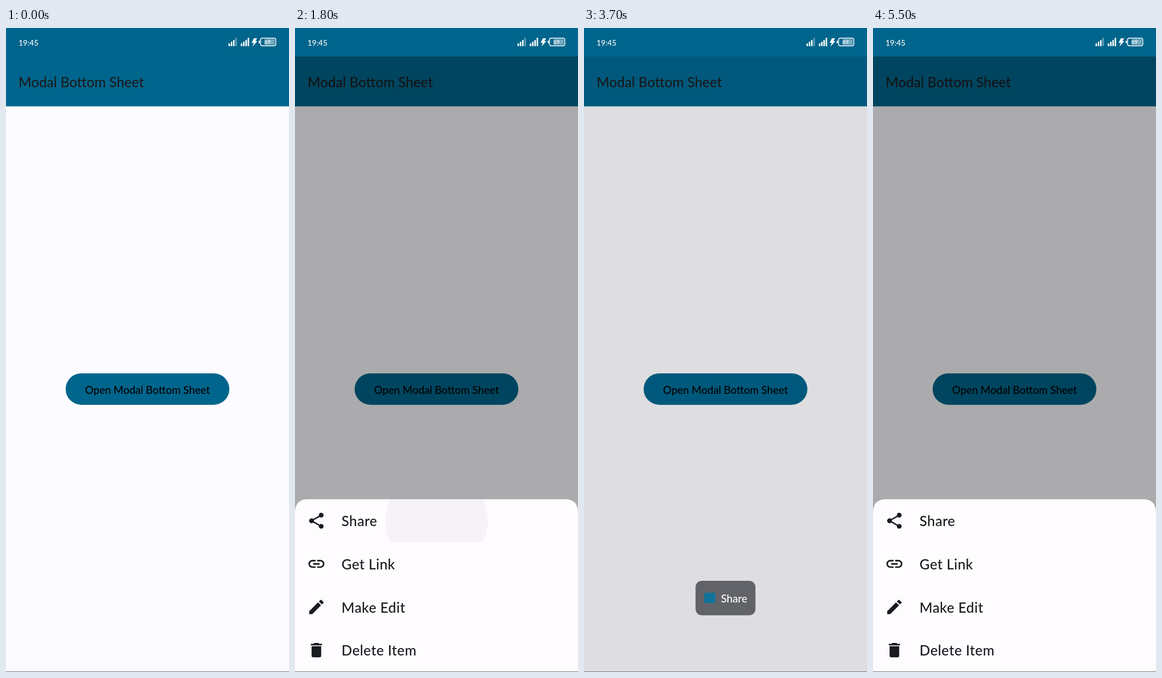
Recreate the animation shown at these times as an HTML page. Size 496 by 1130 pixels, loop 5.6 s.

```html
<!DOCTYPE html>
<html lang="en">
<head>
<meta charset="utf-8">
<title>Modal Bottom Sheet</title>
<style>
  html, body { margin: 0; width: 100%; height: 100%; overflow: hidden; background: #fcfbff; }
  svg { display: block; width: 100%; height: 100%; }
  text { font-family: Lato, "Open Sans", sans-serif; font-weight: 500; white-space: pre; }
  #rows text { font-size: 24.4px; letter-spacing: .5px; }
  #rows { fill: #191b1e; }
</style>
</head>
<body>
<svg viewBox="0 0 496 1130">
  <defs>
    <clipPath id="buttonClip"><rect x="104.5" y="606" width="287" height="55.2" rx="27.6"/></clipPath>
    <clipPath id="sheetClip"><path d="M0 320V24Q0 0 24 0H472Q496 0 496 24V320Z"/></clipPath>
    <clipPath id="rowClip"><rect width="496" height="75.7"/></clipPath>
  </defs>

  <rect width="496" height="1130" fill="#fcfbff"/>
  <rect width="496" height="137.5" fill="#00658c"/>
  <text x="22" y="103.5" font-size="24.2" fill="#1a1c1e">Modal Bottom Sheet</text>

  <g clip-path="url(#buttonClip)">
    <rect x="104" y="606" width="288" height="56" fill="#00658c"/>
    <circle id="buttonRipple" cx="248" cy="634" fill="#fff"/>
  </g>
  <text x="248" y="641.5" font-size="18.6" text-anchor="middle">Open Modal Bottom Sheet</text>

  <rect id="scrim" y="50" width="496" height="1080"/>

  <g fill="#fff">
    <text x="22" y="30.5" font-size="13.5">19:45</text>
    <g id="signals"></g>
    <path d="M434.5 18H440L437.3 23H440.5L432 32.5L434.2 26H430.5Z"/>
    <rect x="443" y="22" width="2" height="5" rx="1"/>
    <rect x="446.2" y="17.7" width="26.6" height="13.6" rx="3" fill="none" stroke="#fff" stroke-width="1.4"/>
    <rect x="453" y="19.5" width="18" height="10" rx="1.5" opacity=".45"/>
    <text x="458.5" y="28" font-size="9.5" text-anchor="middle">69</text>
  </g>

  <g id="sheet">
    <g clip-path="url(#sheetClip)">
      <rect width="496" height="320" fill="#fefcff"/>
      <g clip-path="url(#rowClip)">
        <circle id="rowRipple" cx="248" cy="38" fill="#14141e" opacity=".035"/>
      </g>
    </g>
    <g id="rows"></g>
  </g>

  <g id="toast">
    <rect x="195.5" y="970" width="105" height="60.5" rx="11" fill="#616369"/>
    <rect x="211" y="991" width="19" height="18" fill="#0f7399"/>
    <text x="240" y="1008" font-size="18.7" fill="#fff">Share</text>
  </g>

  <rect y="1129" width="496" height="1" fill="#77777a"/>
</svg>

<script>
const LOOP = 5600, STEP = 100;
const SHEET_TOP = 826.5, SHEET_HEIGHT = 303.5, ROW_HEIGHT = 75.7;
const $ = id => document.getElementById(id);
const clamp = v => Math.max(0, Math.min(1, v));

const items = [
  ["Share", "M18 16.1c-.8 0-1.4.3-2 .8l-7.1-4.2a3 3 0 0 0 0-1.4L16 7.2A3 3 0 1 0 15 5l.1.7L8 9.8a3 3 0 1 0 0 4.4l7.1 4.2-.1.6A3 2.9 0 1 0 18 16.1z"],
  ["Get Link", "M3.9 12A3.1 3.1 0 0 1 7 8.9h4V7H7a5 5 0 0 0 0 10h4v-1.9H7A3.1 3.1 0 0 1 3.9 12zM8 13h8v-2H8zM17 7h-4v1.9h4a3.1 3.1 0 0 1 0 6.2h-4V17h4a5 5 0 0 0 0-10z"],
  ["Make Edit", "M3 17.25V21h3.75L17.8 9.94l-3.75-3.75zM20.7 7.04a1 1 0 0 0 0-1.41l-2.34-2.34a1 1 0 0 0-1.41 0l-1.83 1.83 3.75 3.75z"],
  ["Delete Item", "M6 19a2 2 0 0 0 2 2h8a2 2 0 0 0 2-2V7H6zM19 4h-3.5l-1-1h-5l-1 1H5v2h14z"]
];
$("rows").innerHTML = items.map(([label, icon], i) => `
  <g transform="translate(0 ${i * ROW_HEIGHT})">
    <path transform="translate(20.7 21.3) scale(1.4)" d="${icon}"/>
    <text x="81.5" y="47.7">${label}</text>
  </g>`).join("");

const signal = (x, strength) => [5, 8, 11, 15].map((h, i) =>
  `<rect x="${x + i * 4}" y="${32 - h}" width="2.6" height="${h}" rx="1" opacity="${i < strength ? 1 : .4}"/>`).join("");
$("signals").innerHTML = signal(390, 3) + signal(411.5, 4);

// cubic-bezier(.4, 0, .2, 1), solved by bisection
function ease(x) {
  x = clamp(x);
  if (x === 0 || x === 1) return x;
  let low = 0, high = 1;
  for (let i = 0; i < 24; i++) {
    const s = (low + high) / 2, r = 1 - s;
    if (1.2 * r * r * s + .6 * r * s * s + s ** 3 < x) low = s; else high = s;
  }
  return 3 * (1 - low) * low * low + low ** 3;
}

const openings = [
  { press: 300, slide: 510, end: 1300 },
  { press: 4600, slide: 4650, end: 5500 }
];
const CLOSE = 3412;

function draw(t) {
  const { press, slide, end } = openings[t < 4500 ? 0 : 1];
  const closing = t > CLOSE && t < 4500;

  const shown = closing ? 1 - ease((t - CLOSE) / 300) : ease((t - slide) / 300);
  $("sheet").setAttribute("transform", `translate(0 ${SHEET_TOP + SHEET_HEIGHT * (1 - shown)})`);
  $("sheet").style.display = shown > 0 ? "" : "none";

  const dim = closing ? 1 - clamp((t - CLOSE - 100) / 300) : clamp((t - slide) / 310) ** 1.6;
  $("scrim").setAttribute("opacity", .32 * dim);

  $("buttonRipple").setAttribute("r", t < press ? 0 : 50 + 100 * clamp((t - press) / 200));
  $("buttonRipple").setAttribute("opacity", .12 * clamp((end - t) / 600));

  const rowPressed = t >= 1800 && t < 3500;
  $("rowRipple").setAttribute("r", rowPressed ? 90 + 180 * clamp((t - 1800) / 200) : 0);

  $("toast").setAttribute("opacity", Math.min(clamp((t - 1900) / 300), clamp((4400 - t) / 260)));
}

function tick() {
  draw(Math.floor(performance.now() % LOOP / STEP) * STEP);
  requestAnimationFrame(tick);
}
tick();
</script>
</body>
</html>
```
